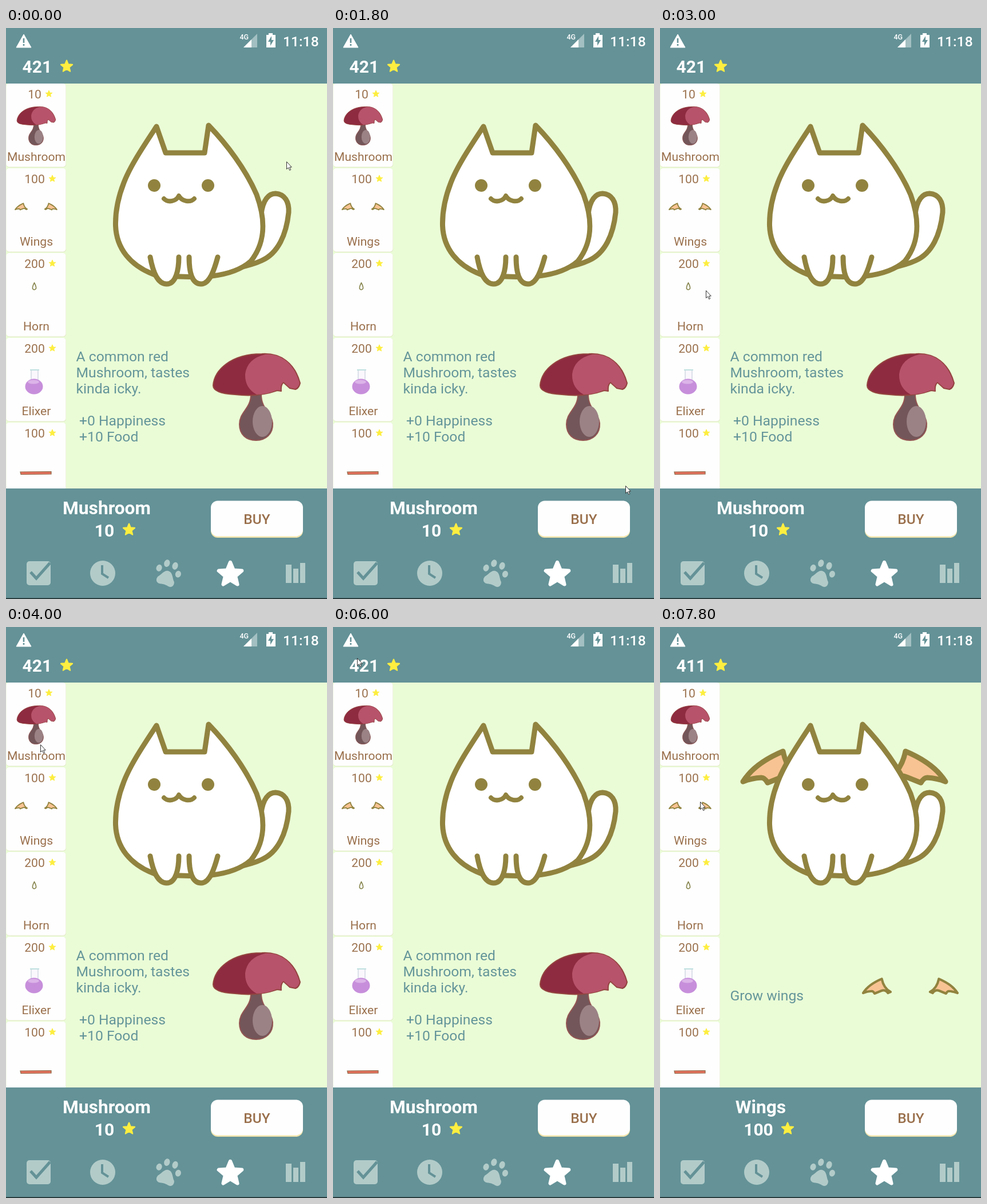
Write an HTML page that moves like this. It is 561x997 px and loops after 8000 ms.

```html
<!DOCTYPE html>
<html lang="en">
<head>
<meta charset="utf-8">
<title>Pet shop</title>
<style>
html, body { margin: 0; width: 100%; height: 100%; overflow: hidden; background: #649297; }
svg { display: block; width: 100%; height: 100%; font-family: Roboto, sans-serif; }
.mid { text-anchor: middle; }
.title { font-size: 31.7px; font-weight: 700; fill: #fff; }
.count { font-size: 30px; font-weight: 700; fill: #fff; }
.desc { font-size: 24.7px; fill: #64959a; }
.card { font-size: 21.1px; fill: #9a704c; }
.line { stroke: #91833f; stroke-width: 9; stroke-linecap: round; stroke-linejoin: round; }
.star { fill: #fdee40; stroke: #fdee40; stroke-width: 2; stroke-linejoin: round; }
.tab { fill: #b2cbc9; }
.cut { fill: none; stroke: #649297; stroke-width: 5; }
</style>
</head>
<body>
<svg viewBox="0 0 561 997">
  <defs>
    <path id="star" d="M0-10 2.7-3.5 9.6-3 4.3 1.5 5.9 8.3 0 4.7-5.9 8.3-4.3 1.5-9.6-3-2.7-3.5Z"/>
    <path id="wing" class="line" fill="#f8c392" d="M145 270Q165 238 215 217Q222 252 248 266L238 270Q228 256 213 262L188 272Q183 263 177 263Q160 264 145 270Z"/>
    <g id="wings">
      <use href="#wing"/>
      <use href="#wing" transform="translate(644) scale(-1 1)"/>
    </g>
    <g id="mushroom" stroke-linejoin="round">
      <path fill="#735659" stroke="#935553" stroke-width="2" d="M428 640C428 665 408 670 408 692C408 710 420 720 437 720C454 720 467 709 466 690C464 671 446 665 446 640Z"/>
      <ellipse cx="448" cy="687" rx="17" ry="27" fill="#9b8285"/>
      <path fill="#8e2b40" stroke="#94453f" stroke-width="2" d="M362 624C364 598 392 569 447 569C481 567 505 586 514 620Q512 629 506 631L496 629 485 619Q480 623 481 634L474 633Q440 645 400 640Q362 638 362 624Z"/>
      <path fill="#b7536a" d="M453 570C481 568 504 587 513 620Q511 628 505 630L496 628 485 618Q479 622 480 633L474 632Q456 640 438 640Q417 628 418 604Q422 577 453 570Z"/>
    </g>
  </defs>

  <rect width="561" height="997" fill="#649297"/>
  <rect y="97" width="561" height="707" fill="#eafcd6"/>

  <!-- status bar -->
  <path d="M31 11 44 34H18Z" fill="#fff" stroke="#fff" stroke-linejoin="round"/>
  <path d="M31 18v8m0 2v3" class="cut" style="stroke-width:2.6"/>
  <text x="408.500" y="20" font-size="12.500" font-weight="500" fill="#fff">4G</text>
  <path d="M415 34 439 10V34Z" fill="#a3bfc1"/>
  <path d="M415 34 429 20V34Z" fill="#fff"/>
  <path d="M455 12h4v-3h7v3h5v22h-16Z" fill="#fff"/>
  <path d="M464 14 458 24h4v7l6-10h-4Z" fill="#649297"/>
  <text x="484" y="32" font-size="24.700" font-weight="500" fill="#fff">11:18</text>
  <text id="coins" class="count" x="28.500" y="77.500"></text>
  <use href="#star" class="star" transform="translate(106 67) scale(1.05)"/>

  <g id="cards"></g>

  <!-- pet -->
  <use id="worn" href="#wings"/>
  <g class="line" fill="#fff">
    <path d="M446 325C449 300 459 289 471 289C487 290 495 303 494 322C490 360 476 393 447 406Q432 413 405 419Z"/>
    <path d="M263 172 279 218H347L354 170C386 203 419 247 438 291C457 343 450 379 428 407C411 422 386 430 360 433Q310 437 260 431C217 415 193 385 191.500 345C191 323 195 298 206 270C217 241 240 207 263 172Z"/>
    <path d="M252 400C257 427 265 447 281 447C297 447 302 422 302 400"/>
    <path d="M320 400C320 426 325 447 341 447C356 447 364 422 370 400"/>
    <path fill="none" stroke-width="8" d="M276 298C284 306 298 302 302 293C307 302 321 306 329 298"/>
  </g>
  <g fill="#91833f"><circle cx="259" cy="275" r="11"/><circle cx="353" cy="275" r="11"/></g>

  <!-- shop bar -->
  <rect y="804" width="561" height="193" fill="#649297"/>
  <rect y="995.500" width="561" height="2" fill="#182426"/>
  <rect x="358" y="828" width="161" height="62" rx="12" fill="#f2e5ad"/>
  <rect id="buy" x="358" y="825.500" width="161" height="62" rx="12" fill="#fefefe"/>
  <text class="mid" x="438.500" y="865.500" font-size="24.500" font-weight="500" fill="#9a704c">BUY</text>

  <g id="mushroomPage">
    <text class="desc"><tspan x="122.500" y="582">A common red</tspan><tspan x="122.500" y="610">Mushroom, tastes</tspan><tspan x="122.500" y="638">kinda icky.</tspan><tspan x="128" y="694">+0 Happiness</tspan><tspan x="128" y="722">+10 Food</tspan></text>
    <use href="#mushroom"/>
    <text class="title mid" x="176" y="849">Mushroom</text>
    <text class="count mid" x="172" y="888">10</text>
    <use href="#star" class="star" transform="translate(215 876) scale(1.050)"/>
  </g>
  <g id="wingsPage">
    <text class="desc" x="122.500" y="652">Grow wings</text>
    <use href="#wings" transform="translate(287.4 513.2) scale(.466)"/>
    <text class="title mid" x="176" y="849">Wings</text>
    <text class="count mid" x="172" y="888">100</text>
    <use href="#star" class="star" transform="translate(223 876) scale(1.050)"/>
  </g>

  <!-- tabs -->
  <g class="tab">
    <rect x="36" y="931" width="42" height="42" rx="5"/>
    <path class="cut" d="M43 950 53 961 77 934"/>
    <circle cx="169" cy="952" r="22"/>
    <path class="cut" style="stroke-width:4" d="M168 938V953L179 960"/>
    <g transform="rotate(18 283 952)">
      <ellipse cx="276" cy="936" rx="5" ry="6.500"/>
      <ellipse cx="291" cy="936" rx="5" ry="6.500"/>
      <ellipse cx="265.500" cy="948" rx="5" ry="6"/>
      <ellipse cx="300.500" cy="948" rx="5" ry="6"/>
      <path d="M283 948C291 948 293 958 298 963C301 970 296 976 288 973Q283 972 278 973C270 976 265 970 268 963C273 958 275 948 283 948Z"/>
    </g>
    <path d="M489 937h10v32h-10Zm13 7h9v25h-9Zm12-10h9v35h-9Z"/>
  </g>
  <use href="#star" fill="#fff" stroke="#fff" stroke-width="3" stroke-linejoin="round" transform="translate(392 954) scale(2.100)"/>

  <path id="cursor" d="M.5.5V13.500L3.500 10.800 5.700 15.500 7.700 14.500 5.600 10H9.300Z" fill="#fff" stroke="#333" stroke-width="1"/>
</svg>
<script>
const $ = id => document.getElementById(id);

const items = [
  [10, 'Mushroom', '<use href="#mushroom" transform="translate(-142 -115.8) scale(.445)"/>'],
  [100, 'Wings', '<use href="#wings" transform="translate(-13.9 261.4) scale(.206)"/>'],
  [200, 'Horn', '<path d="M49.500 445Q46 451 46.500 455Q49 459 52.500 455Q53 451 49.500 445Z" fill="#fff" stroke="#85844c" stroke-width="1.600"/>'],
  [200, 'Elixer', `<path d="M44 598V616H56V598" fill="#faf7fc" stroke="#bcc6d6"/>
    <path d="M42 597H58" stroke="#a9d6d4" stroke-width="1.500"/>
    <ellipse cx="49" cy="626" rx="15.500" ry="13.500" fill="#c78fdb"/>
    <ellipse cx="48" cy="618" rx="10" ry="3.500" fill="#dcb4e8"/>`],
  [100, '', '<path d="M25 775 79 774.500V779L26 779.500Z" fill="#e3705c" stroke="#8d6a48" stroke-width="1.200"/>']
];
$('cards').innerHTML = items.map(([price, name, art], i) => {
  const y = 97 + 148 * i;
  return `<rect x=".5" y="${y + 1}" width="104.500" height="145.500" rx="5" fill="#e3e9c6"/>
    <rect x=".5" y="${y}" width="104" height="145.500" rx="5" fill="#fefefe"/>
    <text class="card mid" x="50" y="${y + 26}">${price}</text>
    <use href="#star" class="star" transform="translate(${price < 100 ? 75 : 81} ${y + 18}) scale(.58)"/>
    <text class="card mid" x="53" y="${y + 135}">${name}</text>${art}`;
}).join('');

// pointer position, one entry per 200 ms
const STEP = 200, LOOP = 8000;
const trail = `490,233 537,420 330,959 0,600 257,72 470,8 530,740 60,958 300,11 511,799
  4,600 400,60 456,500 200,763 29,600 80,458 75,300 70,178 164,763 48,480
  60,205 60,205 55,198 70,330 80,460 89,561 200,640 494,707 543,400 300,120
  42,54 90,60 300,500 450,860 450,860 260,590 70,305`.trim().split(/\s+/);

const show = (id, on) => $(id).setAttribute('visibility', on ? 'visible' : 'hidden');

function draw(now) {
  const t = now % LOOP;
  const i = Math.min(Math.floor(t / STEP), trail.length - 1);
  const winged = t >= 7800;
  $('cursor').setAttribute('transform', `translate(${trail[i]})`);
  $('coins').textContent = t < 6800 ? 421 : 411;
  $('buy').setAttribute('fill', t >= 6600 && t < 6800 ? '#ececec' : '#fefefe');
  show('worn', winged);
  show('wingsPage', winged);
  show('mushroomPage', !winged);
  requestAnimationFrame(draw);
}
draw(0);
</script>
</body>
</html>
```
